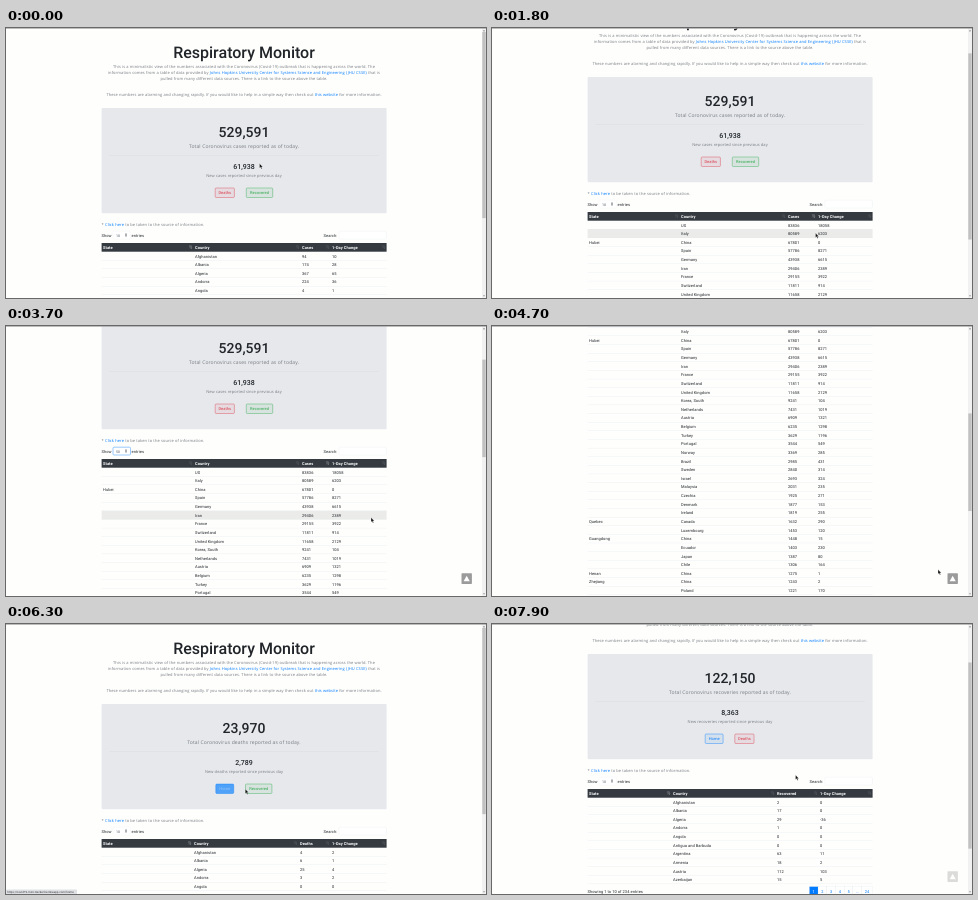
Recreate the animation shown at these times as an HTML page. Size 480x270 px, loop 8 s.

```html
<!DOCTYPE html>
<html lang="en">
<head>
<meta charset="utf-8">
<title>Respiratory Monitor</title>
<style>
html, body { margin: 0; width: 100%; height: 100%; overflow: hidden; background: #fefefd; }
svg { display: block; width: 480px; height: 270px; }
text { font: 4px Roboto, sans-serif; fill: #212529; letter-spacing: .04px; text-rendering: geometricPrecision; white-space: pre; }
.body { font-family: "Open Sans", sans-serif; fill: #777b80; letter-spacing: .09px; }
.lead { font-size: 5px; letter-spacing: .12px; }
.title { font-size: 16px; font-weight: 500; letter-spacing: 0; }
.total { font-size: 14px; font-weight: 500; letter-spacing: 0; }
.daily { font-size: 7px; font-weight: 500; letter-spacing: 0; }
.head { font-weight: 700; fill: #fff; }
.link { fill: #007bff; }
.mid { text-anchor: middle; }
.status { font-size: 2.9px; fill: #333; }
</style>
</head>
<body>
<svg id="stage" viewBox="0 0 480 270"></svg>
<script>
const LOOP = 8000, STEP = 100;
const ROW = 8.63, HEAD_Y = 215, ROWS_Y = 223.7;
const BLUE = '#007bff', RED = '#dc3545', GREEN = '#28a745';

// rows: state|country|count|change
const parse = s => s.trim().split('\n').map(line => line.split('|'));

const byName = parse(`
|Afghanistan|94|10
|Albania|174|28
|Algeria|367|65
|Andorra|224|36
|Angola|4|1`);

const ascending = parse(`
Recovered|Canada|0|0
|Timor-Leste|1|0
|Papua New Guinea|1|0
|Libya|1|0
Anguilla|United Kingdom|2|2`);

const descending = parse(`
|US|83836|18058
|Italy|80589|6203
Hubei|China|67801|0
|Spain|57786|8271
|Germany|43938|6615
|Iran|29406|2389
|France|29155|3922
|Switzerland|11811|914
|United Kingdom|11658|2129
|Korea, South|9241|104
|Netherlands|7431|1019
|Austria|6909|1321
|Belgium|6235|1298
|Turkey|3629|1196
|Portugal|3544|549
|Norway|3369|285
|Brazil|2985|431
|Sweden|2840|314
|Israel|2693|324
|Malaysia|2031|235
|Czechia|1925|271
|Denmark|1877|153
|Ireland|1819|255
Quebec|Canada|1632|290
|Luxembourg|1453|120
Guangdong|China|1448|15
|Ecuador|1403|230
|Japan|1387|80
|Chile|1306|164
Henan|China|1275|1
Zhejiang|China|1243|2
|Poland|1221|170`);

const deaths = parse(`
|Afghanistan|4|2
|Albania|6|1
|Algeria|25|4
|Andorra|3|2
|Angola|0|0`);

const recovered = parse(`
|Afghanistan|2|0
|Albania|17|0
|Algeria|29|-36
|Andorra|1|0
|Angola|0|0
|Antigua and Barbuda|0|0
|Argentina|63|11
|Armenia|18|2
|Austria|112|103
|Azerbaijan|15|5`);

const button = (label, x, w, color, path) => ({ label, x, w, color, path });
const pages = {
  home: { total: '529,591', daily: '61,938', noun: 'cases', column: 'Cases', cols: [97, 189, 296, 326],
    buttons: [button('Deaths', 209.2, 19.2, RED, 'deaths'), button('Recovered', 240.3, 26.4, GREEN, 'recovered')] },
  deaths: { total: '23,970', daily: '2,789', noun: 'deaths', column: 'Deaths', cols: [97, 188, 294, 326],
    buttons: [button('Home', 209.8, 17.9, BLUE, 'home'), button('Recovered', 239.5, 26.4, GREEN, 'recovered')] },
  recovered: { total: '122,150', daily: '8,363', noun: 'recoveries', column: 'Recovered', cols: [97, 181, 285, 328],
    buttons: [button('Home', 213.2, 17.9, BLUE, 'home'), button('Deaths', 242.8, 19.2, RED, 'deaths')] }
};

// keyframes: [time, value, ...]
const cursorKeys = [
  [0, 253.5, 135.5], [200, 262, 60], [300, 268, 30], [500, 285, 110], [700, 300, 228], [800, 303, 219],
  [1400, 303, 219], [1700, 322, 206], [1800, 323.5, 205], [2300, 323.5, 205], [2700, 117, 125],
  [2800, 117, 125], [3000, 117, 141], [3200, 117, 141], [3600, 365, 191.5], [3800, 365, 191.5],
  [4500, 446, 243.5], [4700, 446, 243.5], [4800, 460, 252], [5000, 360, 217], [5100, 348, 209],
  [5200, 348, 209], [5500, 219, 165], [5800, 219, 165], [6200, 226, 165], [6300, 239.3, 165],
  [6400, 252, 165], [6900, 252, 165], [7300, 303.5, 151]
];
const scrollKeys = [
  [1500, 0], [1800, 31], [2200, 82], [3700, 82], [4500, 231], [4800, 231],
  [5000, 60], [5100, 10.5], [5200, 0], [7400, 0], [7900, 50]
];
const upKeys = [[1900, 0], [2200, 1], [5100, 1], [5300, 0], [7700, 0], [7900, .35]];

function track(keys, t) {
  const next = keys.findIndex(k => k[0] > t);
  if (next === 0) return keys[0].slice(1);
  if (next < 0) return keys[keys.length - 1].slice(1);
  const a = keys[next - 1], b = keys[next];
  const p = (t - a[0]) / (b[0] - a[0]);
  return a.slice(1).map((v, i) => v + (b[i + 1] - v) * p);
}

const text = (x, y, s, cls = '', more = '') => `<text x="${x}" y="${y}" class="${cls}" ${more}>${s}</text>`;
const rect = (x, y, w, h, fill, more = '') => `<rect x="${x}" y="${y}" width="${w}" height="${h}" fill="${fill}" ${more}/>`;
const path = (d, fill, more = '') => `<path d="${d}" fill="${fill}" ${more}/>`;
const link = s => `<tspan class="link">${s}</tspan>`;
const within = ([px, py], x, y, w, h) => px >= x && px < x + w && py >= y && py < y + h;
const overButton = (p, b) => within(p, b.x, 160, b.w, 9.5);

function stateAt(t) {
  const name = t < 5800 ? 'home' : t < 6800 ? 'deaths' : 'recovered';
  const rows = name === 'deaths' ? deaths : name === 'recovered' ? recovered
    : t < 1000 ? byName : t < 1300 ? ascending : descending;
  const size = t >= 3100 && t < 5800 ? 50 : 10;
  const scroll = track(scrollKeys, t)[0];
  const cursor = track(cursorKeys, t);
  const before = track(cursorKeys, Math.max(0, t - STEP));
  return { t, page: pages[name], rows, size, scroll, cursor,
    at: [cursor[0], cursor[1] + scroll],
    hover: [before[0], before[1] + scroll] };
}

function intro() {
  return text(238, 30, 'Respiratory Monitor', 'title mid')
    + text(238, 40.3, 'This is a minimalistic view of the numbers associated with the Coronovirus (Covid-19) outbreak that is happening across the world. The', 'body mid')
    + text(238, 46.3, `information comes from a table of data provided by ${link('Johns Hopkins University Center for Systems Science and Engineering (JHU CSSE)')} that is`, 'body mid')
    + text(238, 52.3, 'pulled from many different data sources. There is a link to the source above the table.', 'body mid')
    + text(238, 68.3, `These numbers are alarming and changing rapidly. If you would like to help in a simple way then check out ${link('this website')} for more information.`, 'body mid');
}

function drawButton(b, s) {
  const lit = overButton(s.hover, b), leaving = lit && !overButton(s.at, b);
  const fill = lit ? (leaving ? .65 : 1) : .07;
  const ink = leaving ? '#93c5fb' : lit ? '#fff' : b.color;
  return rect(b.x, 160, b.w, 9.5, b.color, `rx="1" fill-opacity="${fill}" stroke="${b.color}" stroke-width=".4"`)
    + text(b.x + b.w / 2, 166.2, b.label, 'mid', `style="fill:${ink}"`);
}

function summary(s) {
  const { total, daily, noun, buttons } = s.page;
  return rect(95.6, 80, 285, 105.3, '#e6e8ec', 'rx="1"')
    + text(238, 109, total, 'total mid')
    + text(238, 120, `Total Coronovirus ${noun} reported as of today.`, 'body lead mid')
    + rect(103.5, 127.7, 269, .3, '#d2d4d8')
    + text(238, 141, daily, 'daily mid')
    + text(238, 149.2, `New ${noun} reported since previous day`, 'body mid')
    + buttons.map(b => drawButton(b, s)).join('');
}

function controls(s) {
  const focus = s.t >= 2800 && s.t < 4800;
  return text(95.6, 198, `* ${link('Click here')} to be taken to the source of information.`, 'body')
    + text(95.6, 208.6, 'Show')
    + rect(107, 203.2, 17.5, 7.8, '#fff', `rx="1" stroke="${focus ? '#80bdff' : '#eceef0'}" stroke-width="${focus ? .8 : .3}"`)
    + text(110, 208.5, s.size, '', 'style="font-size:3.5px;fill:#495057"')
    + path('M119 206.6l1-1.3 1 1.3zM119 207.4l1 1.3 1-1.3z', '#343a40')
    + text(125.6, 208.6, 'entries')
    + text(317.6, 208.6, 'Search:')
    + rect(333, 203.2, 47.4, 7.8, '#fff', 'rx="1" stroke="#e3e6ea" stroke-width=".3"');
}

function sortIcon(x, active) {
  const y = HEAD_Y + 5.5;
  return path(`M${x} ${y}v-3m-.6 .8l.6-.8.6.8M${x + 1.4} ${y - 3}v3m-.6-.8l.6.8.6-.8`, 'none',
    `stroke="#fff" stroke-width=".3" opacity="${active ? .75 : .3}"`);
}

function table(s) {
  const { cols, column } = s.page;
  const sorted = s.page === pages.home && s.t >= 1000 ? 2 : 0;
  const ends = [...cols.slice(1).map(x => x - 5), 377];
  const labels = ['State', 'Country', column, '1-Day Change'];
  let out = rect(95.6, HEAD_Y, 285, 8.7, '#343a40')
    + labels.map((l, i) => text(cols[i], HEAD_Y + 5.8, l, 'head') + sortIcon(ends[i], i === sorted)).join('');
  s.rows.slice(0, s.size).forEach((row, i) => {
    const y = ROWS_Y + i * ROW;
    if (within(s.hover, 95.6, y, 285, ROW)) out += rect(95.6, y, 285, ROW, '#000', 'opacity=".075"');
    out += rect(95.6, y + ROW - .2, 285, .25, '#dee2e6')
      + row.map((cell, c) => cell && text(cols[c], y + 5.8, cell)).join('');
  });
  return out;
}

function footer(s) {
  const y = ROWS_Y + s.size * ROW + 2.6;
  const labels = s.size === 10 ? ['1', '2', '3', '4', '5', '…', '24'] : ['1', '2', '3', '4', '5'];
  const left = 380.5 - labels.length * 8.7 - (s.size === 10 ? 2.2 : 0);
  return text(95.6, y + 6.6, `Showing 1 to ${s.size} of 234 entries`)
    + labels.map((l, i) => {
      const w = l.length > 1 ? 10.9 : 8.7, x = left + i * 8.7;
      return rect(x, y, w, 9.5, i ? '#fff' : BLUE, 'stroke="#dee2e6" stroke-width=".25"')
        + text(x + w / 2, y + 6.2, l, 'mid', `style="fill:${i ? BLUE : '#fff'}"`);
    }).join('');
}

function dropdown(s) {
  if (s.t < 2800 || s.t >= 3100) return '';
  const picked = Math.max(0, Math.min(3, Math.floor((s.cursor[1] - 129) / 5)));
  return rect(107, 129, 17.5, 20, '#fff', 'stroke="#8a8a8a" stroke-width=".3"')
    + ['10', '25', '50', '100'].map((l, i) =>
      (i === picked ? rect(107, 129 + i * 5, 17.5, 5, '#1e90ff') : '')
      + text(110, 132.8 + i * 5, l, '', `style="font-size:3.5px;fill:${i === picked ? '#fff' : '#495057'}"`)).join('');
}

function chrome(s) {
  const height = 380 + (s.size - 10) * ROW;
  const up = track(upKeys, s.t)[0];
  const hovered = s.page.buttons.find(b => overButton(s.hover, b));
  let out = `<g opacity="${up}">${rect(455.5, 247.3, 10.4, 10.6, '#9b9b9b', 'rx=".6"')}${path('M457.6 255.2l3.1-5.4 3.1 5.4z', '#fff')}</g>`
    + rect(476, 0, 4, 270, '#f1f1f1')
    + path('M477 3.2l1-1.2 1 1.2zM477 267.4l1 1.2 1-1.2z', '#606060')
    + rect(476.3, 4 + s.scroll * 262 / height, 3.4, 270 * 262 / height, '#c1c1c1')
    + rect(0, 0, 480, .7, '#a3a3a3');
  if (hovered) {
    out += rect(0, 265.4, 71, 4.6, '#dfe1e5', 'rx=".5"')
      + text(1.2, 268.8, `https://covid19-mini-tracker.herokuapp.com/${hovered.path}`, 'status');
  }
  return out;
}

function pointer(s) {
  const [x, y] = s.cursor;
  const hand = within(s.at, 95.6, HEAD_Y, 285, 8.7) || s.page.buttons.some(b => overButton(s.at, b))
    || within(s.cursor, 455.5, 247.3, 10.4, 10.6);
  const shape = hand
    ? 'M-.4 0Q.2-.4.6 0V2.2L2.8 2.7Q3.2 3 3 4.2L2.5 5.8H-.3L-1.9 3.6Q-1.8 2.9-1.1 3.1L-.4 3.6Z'
    : 'M0 0V4.6L1.1 3.7L1.9 5.5L2.7 5.1L1.9 3.4H3.3Z';
  return `<g transform="translate(${x} ${y})">${path(shape, '#111', 'stroke="#fff" stroke-width=".3"')}</g>`;
}

const stage = document.getElementById('stage');
function draw(t) {
  const s = stateAt(t);
  stage.innerHTML = rect(0, 0, 480, 270, '#fefefd')
    + `<g transform="translate(0 ${-s.scroll})">${intro()}${summary(s)}${controls(s)}${table(s)}${footer(s)}</g>`
    + dropdown(s) + chrome(s) + pointer(s);
}

let start, shown = -1;
function tick(now) {
  start ??= now;
  const t = Math.floor(((now - start) % LOOP) / STEP) * STEP;
  if (t !== shown) draw(shown = t);
  requestAnimationFrame(tick);
}
draw(0);
requestAnimationFrame(tick);
</script>
</body>
</html>
```
